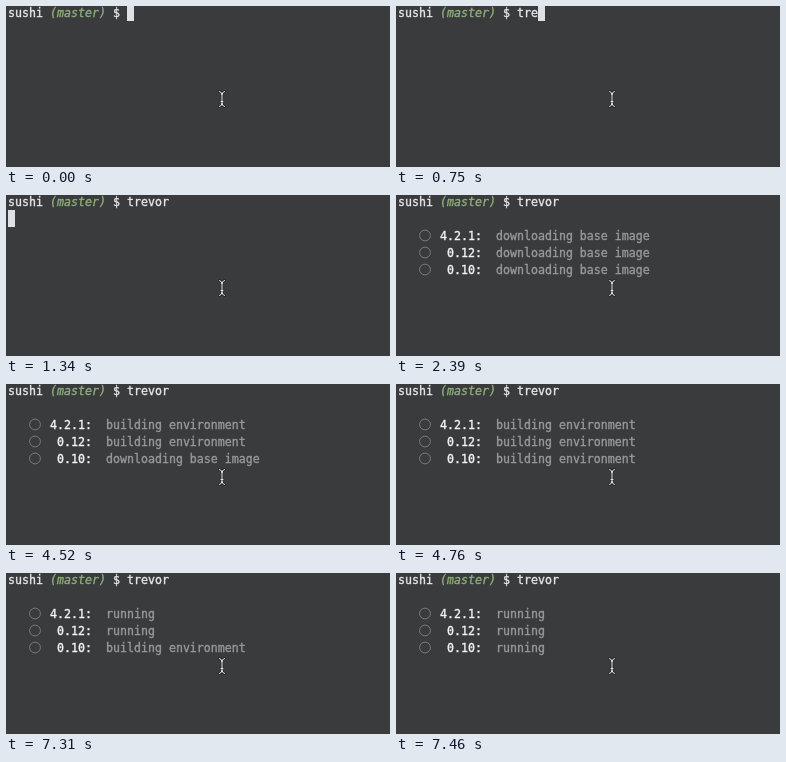
An HTML page that plays this animation: 384x161 px, repeating every 8 s.

```html
<!DOCTYPE html>
<html lang="en">
<head>
<meta charset="utf-8">
<title>Terminal</title>
<style>
  html, body { margin: 0; width: 100%; height: 100%; overflow: hidden; background: #3a3b3c; }
  svg { display: block; width: 384px; height: 161px; }
  text {
    font: 11.627px "DejaVu Sans Mono", "Liberation Mono", monospace;
    color: #e6e8ea; fill: currentColor; stroke: currentColor; stroke-width: .35;
    white-space: pre;
  }
  .branch { color: #8fae7c; font-style: italic; }
  .version { color: #f4f4f4; }
  .status { color: #999; }
  .ring { fill: none; stroke: #808182; stroke-width: .9; }
</style>
</head>
<body>
<svg id="stage" viewBox="0 0 384 161">
  <rect width="384" height="161" fill="#3a3b3c"/>
  <g id="prompt"></g>
  <g id="jobs"></g>
  <rect id="caret" width="7" fill="#dfe2e5"/>
  <g id="pointer" fill="none" stroke-linecap="round"></g>
</svg>
<script>
const NS = "http://www.w3.org/2000/svg";
const LOOP = 8000, CELL = 7, LINE = 17;
const COMMAND = "trevor";
const KEY_TIMES = [450, 690, 750, 980, 1070, 1220];
const ENTER = 1340, LIST = 2390;
const PHASES = ["downloading base image", "building environment", "running"];
const JOBS = [
  { version: "4.2.1:", changes: [4520, 7310] },
  { version: " 0.12:", changes: [4520, 7310] },
  { version: " 0.10:", changes: [4760, 7460] }
];
const BEAM = "M213.5 85.5 Q216 86 216 89 Q216 86 218.5 85.5 M216 89 V97 " +
  "M213.5 100.5 Q216 100 216 97 Q216 100 218.5 100.5 M215 95.5 H217";

const $ = id => document.getElementById(id);
const colX = col => 2 + col * CELL;
const baseline = row => 11 + row * LINE;
const countPassed = (times, t) => times.filter(at => t >= at).length;

function add(parent, tag, attrs) {
  const el = document.createElementNS(NS, tag);
  for (const key in attrs) el.setAttribute(key, attrs[key]);
  parent.appendChild(el);
  return el;
}

function addText(parent, col, row, content, cls = "") {
  const el = add(parent, "text", { x: colX(col), y: baseline(row), class: cls });
  el.textContent = content;
  return el;
}

function setText(el, content) {
  if (el.textContent !== content) el.textContent = content;
}

// A light stroke over a dark outline.
add($("pointer"), "path", { d: BEAM, stroke: "#242526", "stroke-width": 2.4 });
add($("pointer"), "path", { d: BEAM, stroke: "#ececec", "stroke-width": 1 });

addText($("prompt"), 0, 0, "sushi");
addText($("prompt"), 6, 0, "(master)", "branch");
addText($("prompt"), 15, 0, "$");
const typed = addText($("prompt"), 17, 0, "");

const statuses = JOBS.map((job, i) => {
  const row = i + 2;
  add($("jobs"), "circle", { cx: 29, cy: baseline(row) - 4.5, r: 5.4, class: "ring" });
  addText($("jobs"), 6, row, job.version, "version");
  return addText($("jobs"), 14, row, "", "status");
});

function draw(t) {
  const keys = countPassed(KEY_TIMES, t);
  const entered = t >= ENTER, listed = t >= LIST;
  const caret = $("caret");

  setText(typed, COMMAND.slice(0, keys));
  caret.setAttribute("x", entered ? colX(0) : colX(17 + keys));
  caret.setAttribute("y", entered ? 15 : 0);
  caret.setAttribute("height", entered ? 17 : 15);
  caret.setAttribute("visibility", listed ? "hidden" : "visible");

  $("jobs").setAttribute("visibility", listed ? "visible" : "hidden");
  JOBS.forEach((job, i) => setText(statuses[i], PHASES[countPassed(job.changes, t)]));
}

const start = performance.now();
function tick() {
  draw((performance.now() - start) % LOOP);
  requestAnimationFrame(tick);
}
draw(0);
requestAnimationFrame(tick);
</script>
</body>
</html>
```
